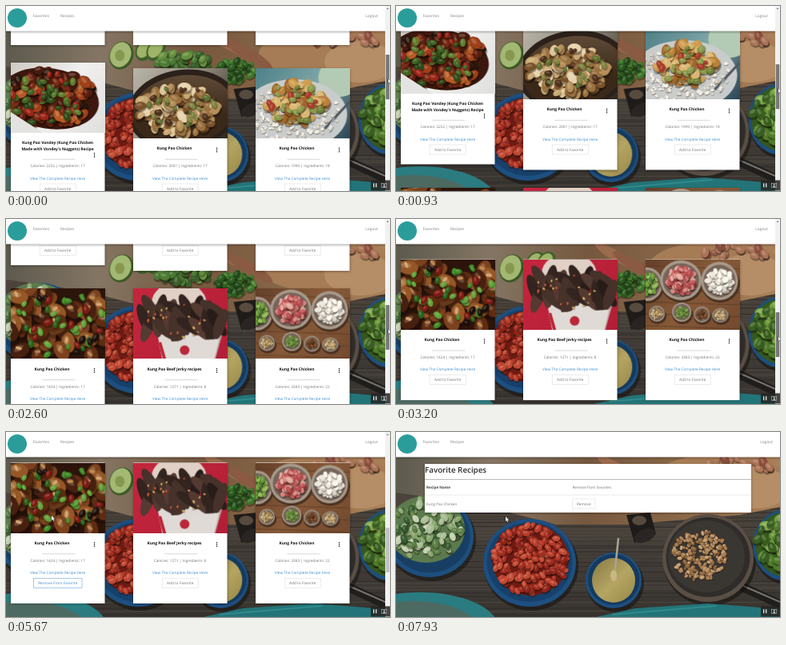
Recreate the animation shown at these times as an HTML page with a canvas. Size 480 by 232 pixels, loop 8000 ms.

```html
<!DOCTYPE html>
<html lang="en">
<head>
<meta charset="utf-8">
<title>Recipes</title>
<style>
html, body { margin: 0; width: 100%; height: 100%; overflow: hidden; background: #fff; }
canvas { display: block; width: 480px; height: 232px; }
</style>
</head>
<body>
<canvas id="stage"></canvas>
<script>
const W = 480, H = 232, LOOP = 8000;
const CARD_W = 117.5, CARD_H = 176.5, PHOTO_H = 88;
const FONT = '"Open Sans", "Noto Sans", sans-serif';
const GRAY = '#747474', BLUE = '#3c8dce';
const dpr = Math.max(1, window.devicePixelRatio || 1);

// Drawing helpers: g is always the current 2D context
let g, seed;
const random = () => {
  seed = (seed * 1664525 + 1013904223) >>> 0;
  return seed / 4294967296;
};
const pick = list => list[Math.floor(random() * list.length)];

function rect(x, y, w, h, color) {
  g.fillStyle = color;
  g.fillRect(x, y, w, h);
}
function oval(x, y, rx, ry, color, turn = 0) {
  g.fillStyle = color;
  g.beginPath();
  g.ellipse(x, y, rx, ry, turn, 0, 7);
  g.fill();
}
function poly(points, color) {
  g.fillStyle = color;
  g.beginPath();
  points.forEach(([x, y]) => g.lineTo(x, y));
  g.fill();
}
function line(x1, y1, x2, y2, color, width) {
  g.strokeStyle = color;
  g.lineWidth = width;
  g.beginPath();
  g.moveTo(x1, y1);
  g.lineTo(x2, y2);
  g.stroke();
}
// One lit piece of food with a soft shadow below it
function morsel(x, y, s, color) {
  const turn = random() * 3;
  oval(x + s * 0.1, y + s * 0.3, s * 1.05, s * 0.75, 'rgba(15,8,4,.35)', turn);
  oval(x, y, s, s * 0.68, color, turn);
  oval(x - s * 0.15, y - s * 0.2, s * 0.5, s * 0.25, 'rgba(255,245,225,.2)', turn);
}
function scatter(n, x, y, rx, ry, size, colors) {
  for (let i = 0; i < n; i++) {
    const a = random() * 6.283, d = Math.sqrt(random());
    morsel(x + rx * d * Math.cos(a), y + ry * d * Math.sin(a), size * (0.7 + random() * 0.6), pick(colors));
  }
}
function shade(x1, y1, x2, y2, ...colors) {
  const fill = g.createLinearGradient(x1, y1, x2, y2);
  colors.forEach((c, i) => fill.addColorStop(i / (colors.length - 1), c));
  return fill;
}
function bowl(x, y, rx, ry, rim, inside) {
  oval(x + 2, y + 4, rx + 1, ry + 1, 'rgba(15,12,10,.5)');
  oval(x, y, rx, ry, rim);
  oval(x, y - 1, rx * 0.92, ry * 0.91, inside);
}
function layer(w, h, start, draw) {
  const canvas = document.createElement('canvas');
  canvas.width = w * dpr;
  canvas.height = h * dpr;
  g = canvas.getContext('2d');
  g.scale(dpr, dpr);
  seed = start;
  draw(w, h);
  return canvas;
}

const backdrop = layer(W, H, 11, () => {
  rect(0, 0, W, H, shade(0, 90, 0, H, '#4c443c', '#423d38', '#37332f'));
  for (let y = 98; y < H; y += 4) line(0, y, W, y + random() * 6 - 3, pick(['#302c29', '#4e4841', '#3d3832']), 1);
  // cutting board, avocado, hands and bread
  poly([[0, 25], [W, 25], [W, 94], [430, 104], [290, 116], [200, 116], [130, 98], [60, 84], [0, 76]],
    shade(0, 30, W, 60, '#5c5a4e', '#857664', '#76583f', '#8a6848', '#ab8158'));
  oval(405, 60, 85, 32, '#a67c56');
  oval(448, 70, 45, 26, '#b58d66');
  scatter(18, 430, 40, 50, 9, 6, ['#94584a', '#aa7459', '#8c4c3c']);
  oval(146, 62, 15, 18, '#3c5a24', 0.4);
  oval(145, 61, 13, 16, '#a3b873', 0.4);
  oval(144, 62, 6, 7, '#86984f');
  for (const x of [176, 190]) {
    oval(x, 55, 11, 15, '#40602a', 0.6);
    oval(x - 1, 54, 8, 12, '#9fb469', 0.6);
  }
  scatter(45, 225, 68, 32, 13, 6, ['#4c7a34', '#66913f', '#38602a']);
  for (let i = 0; i < 5; i++) oval(270 + i * 12, 42 + i * 6, 23, 6, pick(['#8a5a42', '#9c6a4d']), 0.6);
  scatter(60, 290, 82, 25, 13, 5, ['#2a5a20', '#3c7528', '#4f8733', '#204619']);
  // bowls and pan
  bowl(42, 131, 55, 51, '#1d4f7e', '#183f63');
  oval(38, 122, 48, 42, '#5c7a4d');
  scatter(125, 37, 121, 44, 38, 5, ['#a9bd96', '#c3d0b2', '#5b7f46', '#365c30', '#86a56e']);
  bowl(167, 164, 58, 55, '#1d4f80', '#17406a');
  oval(168, 160, 48, 45, '#6b1b13');
  scatter(210, 168, 160, 46, 43, 4.6, ['#a42d1f', '#b83b2a', '#90241a', '#c24a35']);
  poly([[288, 104], [318, 101], [325, 128], [298, 139]], '#1f1b19');
  oval(311, 130, 14, 8, '#2a2522', -0.4);
  oval(304, 111, 9, 6, '#574b40');
  bowl(272, 186, 35, 35, '#1d4f80', '#153a5e');
  oval(272, 186, 27, 28, shade(248, 165, 296, 214, '#8e8048', '#b5a562', '#9a8a49'));
  line(278, 133, 273, 180, '#aaa391', 2.5);
  oval(272, 180, 4, 7, '#c4b983');
  line(432, 194, 482, 217, '#1f1e1d', 11);
  line(434, 193, 482, 214, '#77736d', 2);
  bowl(390, 158, 57, 55, '#5a4f45', '#2f2c2a');
  oval(388, 156, 48, 45, '#3a3632');
  scatter(210, 380, 154, 34, 31, 2.8, ['#b58a5c', '#a27548', '#c29b70', '#8b6139']);
  bowl(485, 142, 39, 44, '#1d4f80', '#36571f');
  scatter(70, 483, 137, 31, 34, 7, ['#4f7c2a', '#6a983a', '#375e20', '#7da84c']);
  // cloth
  oval(30, 246, 98, 45, '#2a7c80');
  oval(22, 252, 84, 40, '#4d6a62');
  poly([[250, 232], [300, 221], [390, 215], [480, 222], [480, 232]], '#237478');
  line(270, 229, 400, 218, '#308a8c', 2);
});

const photos = {
  nuggets: layer(CARD_W, PHOTO_H, 3, (w, h) => {
    rect(0, 0, w, h, shade(0, 0, w, h, '#cfcac4', '#f1f0ef', '#dfdfde'));
    oval(48, 45, 62, 38, '#3b170d', 0.15);
    scatter(130, 48, 43, 56, 35, 7, ['#7a2b14', '#471a0e', '#a04019', '#b95a25', '#5f2010', '#27160c']);
    scatter(45, 42, 45, 50, 33, 5, ['#3f6322', '#2a4a18', '#5d7f2f', '#9c2418']);
    poly([[0, 62], [40, 88], [0, 88]], '#e3e3e2');
  }),
  pan: layer(CARD_W, PHOTO_H, 8, (w, h) => {
    rect(0, 0, w, h, shade(0, 0, w, h, '#b9b5a8', '#8d877a', '#2c251e'));
    oval(62, 52, 70, 50, '#2b211a', -0.15);
    oval(62, 53, 64, 44, shade(0, 10, 0, 60, '#5e4936', '#3a2819'), -0.15);
    scatter(110, 56, 53, 50, 30, 7, ['#c9a772', '#b68f58', '#dcc398', '#9a713f', '#e6d3ae', '#7a522b']);
    scatter(30, 62, 50, 44, 28, 4, ['#7d8440', '#5f7030', '#4c2e1b']);
  }),
  rice: layer(CARD_W, PHOTO_H, 5, (w, h) => {
    rect(0, 0, w, h, shade(0, 0, w, h, '#4f8088', '#7fa6a8', '#2c4455'));
    oval(104, 12, 26, 24, '#b3cbb4');
    oval(48, 58, 66, 44, '#c9cccb');
    scatter(230, 47, 56, 57, 36, 2.5, ['#f3efe6', '#dfd9cc', '#c8c2b6']);
    scatter(75, 50, 43, 37, 26, 7, ['#bb8138', '#cf9d4f', '#a16529', '#dab772']);
    scatter(28, 48, 43, 37, 25, 4.5, ['#a93a2a', '#6b7f38', '#8a9a4c']);
    line(86, 76, 117, 42, '#4d5860', 3);
    for (let i = 0; i < 4; i++) line(84 + i * 4, 86 - i, 98 + i * 4, 62 + i, '#c3cacd', 1.2);
  }),
  glazed: layer(CARD_W, PHOTO_H, 21, (w, h) => {
    rect(0, 0, w, h, '#2c140b');
    for (let i = 0; i < 46; i++) {
      const x = random() * w, y = random() * h;
      morsel(x, y, 13, pick(['#7c421d', '#955726', '#5f2c12', '#47200f']));
      oval(x - 2, y - 3, 4, 2, pick(['#c18a52', '#d7a873']), i);
    }
    scatter(34, 62, 44, 58, 42, 4.5, ['#3f8a27', '#27631c', '#62a33a']);
    scatter(14, 60, 44, 55, 40, 5, ['#7c1a12', '#1a0e0a']);
  }),
  jerky: layer(CARD_W, PHOTO_H, 14, (w, h) => {
    rect(0, 0, w, h, shade(0, 0, w, h, '#c5263e', '#b21f36'));
    oval(57, 17, 34, 25, '#e0d0c6');
    poly([[30, 56], [112, 52], [102, 88], [36, 88]], '#dfd9d5');
    poly([[102, 53], [112, 50], [102, 88], [96, 88]], '#b4a8a4');
    for (let i = 0; i < 24; i++) {
      const x = 14 + i * 4.1, y = 38 + Math.sin(i * 2.3) * 13;
      oval(x, y, 20, 7, pick(['#33241f', '#46322b', '#543a31', '#281c19']), 1.2 + Math.sin(i * 1.7) * 0.7);
    }
    scatter(22, 58, 38, 44, 24, 1.7, ['#d5a85d', '#c95332']);
    poly([[31, 67], [107, 63], [101, 88], [37, 88]], '#e0dad6');
    poly([[31, 67], [35, 67], [41, 88], [37, 88]], '#b92739');
    oval(64, 77, 6, 6, '#b92739');
  }),
  bowls: layer(CARD_W, PHOTO_H, 7, (w, h) => {
    rect(0, 0, w, h, shade(0, 0, w, h, '#64402a', '#875a38', '#734a2f'));
    for (let y = 8; y < h; y += 15) line(0, y, w, y + 4, '#5a3925', 0.8);
    const dishes = [
      [2, 31, 19, 21, ['#699b38', '#94b956', '#3f762b']],
      [44, 26, 26, 25, ['#c75a5a', '#dc8580', '#b6484b', '#e4aaa0']],
      [92, 27, 23, 24, ['#eee9de', '#dcd3c7', '#fffaf0']],
      [45, 66, 12, 12, ['#5d8b35', '#8ba351']],
      [70, 69, 10, 10, ['#62381d', '#8c532c']],
      [93, 70, 10, 9, ['#c3a068', '#dec493']],
      [14, 68, 10, 10, ['#d5bc87', '#b7914f']]
    ];
    for (const [x, y, rx, ry, colors] of dishes) {
      oval(x + 1, y + 3, rx + 1, ry, '#483020');
      oval(x, y, rx, ry, '#a89a8b');
      oval(x, y, rx * 0.87, ry * 0.85, '#75655a');
      scatter(rx * 4, x, y, rx * 0.67, ry * 0.63, rx * 0.16, colors);
    }
  })
};

const CARDS = [
  { x: 6, y: 71, photo: 'nuggets', title: ['Kung Pao Vondey (Kung Pao Chicken', "Made with Vondey's Nuggets) Recipe"], calories: 2252, ingredients: 17 },
  { x: 159, y: 78, photo: 'pan', title: ['Kung Pao Chicken'], calories: 2001, ingredients: 17 },
  { x: 312, y: 78, photo: 'rice', title: ['Kung Pao Chicken'], calories: 1990, ingredients: 18 },
  { x: 6, y: 277, photo: 'glazed', title: ['Kung Pao Chicken'], calories: 1424, ingredients: 17, clickable: true },
  { x: 159, y: 277, photo: 'jerky', title: ['Kung Pao Beef Jerky recipes'], calories: 1271, ingredients: 8 },
  { x: 312, y: 277, photo: 'bowls', title: ['Kung Pao Chicken'], calories: 3383, ingredients: 22 }
];

// Rows are [time, value, ...]; the given function eases each stretch
const SCROLL = [[0, 0], [70, 0], [900, 49], [1250, 49], [2130, 99.5], [2600, 189.5], [3400, 238.5]];
const POINTER = [[3500, 478, 150], [4350, 69, 192.5], [5300, 69, 192.5], [6050, 44.5, 14], [7150, 44.5, 14], [7930, 137, 106]];
const CLICK = 4950, STATUS = 6200, NEXT_PAGE = 7300, RELEASE = 3480;
const linear = p => p;
const smooth = p => p * p * (3 - 2 * p);

function track(rows, t, ease) {
  const i = rows.findIndex(row => row[0] > t);
  if (i === 0) return rows[0].slice(1);
  if (i < 0) return rows[rows.length - 1].slice(1);
  const a = rows[i - 1], b = rows[i], p = ease((t - a[0]) / (b[0] - a[0]));
  return a.slice(1).map((v, k) => v + (b[k + 1] - v) * p);
}

// y is the middle of the capitals
function text(str, x, y, { size = 4.7, weight = 400, color = GRAY, align = 'left' } = {}) {
  g.font = `${weight} ${size}px ${FONT}`;
  g.textAlign = align;
  g.fillStyle = color;
  g.fillText(str, x, y + size * 0.36);
}
function button(label, x, y, w, color = GRAY, border = '#dedede') {
  rect(x, y, w, 12, '#fff');
  g.strokeStyle = border;
  g.lineWidth = 0.6;
  g.strokeRect(x, y, w, 12);
  text(label, x + w / 2, y + 6, { color, align: 'center' });
}
function panel(x, y, w, h) {
  g.save();
  g.shadowColor = 'rgba(0,0,0,.35)';
  g.shadowBlur = 3 * dpr;
  g.shadowOffsetY = dpr;
  rect(x, y, w, h, '#fff');
  g.restore();
}

function drawCard(card, scroll, hovered, favorite) {
  const { x, title } = card, y = card.y - scroll;
  if (y > H || y + CARD_H < 20) return;
  panel(x, y, CARD_W, CARD_H);
  g.drawImage(photos[card.photo], x, y, CARD_W, PHOTO_H);
  const middle = x + 58.5, wrapped = title.length > 1, drop = wrapped ? 7 : 0;
  title.forEach((row, i) => text(row, middle - (wrapped ? 0 : 7), y + 100.5 + i * 7.4,
    { size: 4.95, weight: 700, color: '#111', align: 'center' }));
  const dots = y + 102.5 + (wrapped ? 13.5 : 0);
  for (let i = -1; i < 2; i++) oval(x + 104.5, dots + i * 2.2, 0.75, 0.75, '#111');
  line(x + 39.5, y + drop + 114.3, x + 80.5, y + drop + 114.3, '#bcbcbc', 0.6);
  text(`Calories: ${card.calories} | Ingredients: ${card.ingredients}`, middle, y + drop + 122.5, { align: 'center' });
  text('View The Complete Recipe Here', middle, y + drop + 138, { color: BLUE, align: 'center' });
  if (favorite) button('Remove From Favorite', x + 28.5, y + 145, 60.5, BLUE, '#6ba6d8');
  else button('Add to Favorite', x + 36.2, y + drop + 145, 45, GRAY, hovered ? '#999' : '#dedede');
}

function drawNav(width, hovered) {
  rect(0, 31, width, 4, shade(0, 31, 0, 35, 'rgba(0,0,0,.3)', 'rgba(0,0,0,0)'));
  rect(0, 0, width, 31.5, '#fff');
  oval(14, 15, 12, 12, '#2a9d9b');
  if (hovered) rect(28, 0, 32, 24, '#ececec');
  text('Favorites', 33.5, 12, { size: 4.85, color: hovered ? BLUE : '#858585' });
  text('Recipes', 68, 12, { size: 4.85, color: '#858585' });
  text('Logout', width - 9, 12, { size: 4.85, color: '#858585', align: 'right' });
}

function drawFavorites() {
  panel(36, 40, 408, 61);
  text('Favorite Recipes', 36, 47.8, { size: 9.8, weight: 600, color: '#2c2c2c' });
  line(36, 59.5, 444, 59.5, '#aaa', 0.8);
  text('Recipe Name', 38, 69.5, { size: 4.6, weight: 700, color: '#444' });
  text('Remove from favorites', 220.5, 69.5, { size: 4.6 });
  line(36, 79, 444, 79, '#ddd', 0.6);
  text('Kung Pao Chicken', 38, 90, { size: 4.6 });
  button('Remove', 220.5, 84, 28.5);
}

function drawControls() {
  rect(456, 218.5, 24, 13, 'rgba(38,37,35,.85)');
  rect(459, 222.3, 1.4, 5, '#ddd');
  rect(462, 222.3, 1.4, 5, '#ddd');
  g.strokeStyle = '#bbb';
  g.lineWidth = 0.6;
  g.strokeRect(469.5, 222.3, 6.3, 5);
  oval(472.7, 224.2, 0.9, 0.9, '#ddd');
  poly([[471, 227.2], [472.7, 225], [474.5, 227.2]], '#ddd');
}

const HAND = new Path2D('M-.7 0Q0-.7.7 0V3L3.6 3.7 4.2 4.6 3.8 7.2 3 8.8H-1L-3.2 5.6-2.6 4.7-.7 6Z');
const ARROW = new Path2D('M0 0V6L1.4 4.8 2.4 7 3.3 6.6 2.4 4.5H4.2Z');
function drawPointer(x, y, hand) {
  const shape = hand ? HAND : ARROW;
  g.save();
  g.translate(x, y);
  g.lineWidth = 0.9;
  g.strokeStyle = '#222';
  g.stroke(shape);
  g.fillStyle = '#fff';
  g.fill(shape);
  g.restore();
}

const stage = document.getElementById('stage');
stage.width = W * dpr;
stage.height = H * dpr;
const screen = stage.getContext('2d');

function draw(t) {
  g = screen;
  g.setTransform(dpr, 0, 0, dpr, 0, 0);
  g.textRendering = 'geometricPrecision';
  const [scroll] = track(SCROLL, t, linear);
  const thumb = 61 + scroll * 0.2474;
  const [px, py] = t < POINTER[0][0] ? [478, thumb + 30] : track(POINTER, t, smooth);
  const overLink = px > 28 && px < 60 && py < 24;
  const overButton = px > 42 && px < 87 && py > 183 && py < 195;
  const listing = t < NEXT_PAGE, width = listing ? 474 : W;

  g.drawImage(backdrop, 0, 0, width, H);
  if (listing) {
    for (const x of [6, 159, 312]) panel(x, -128 - scroll, CARD_W, 177);
    for (const card of CARDS) {
      drawCard(card, scroll, card.clickable && overButton, card.clickable && t >= CLICK);
    }
    rect(474, 0, 6, H, '#f1f1f1');
    rect(474.7, thumb, 4.6, 56, t < RELEASE ? '#787878' : '#c1c1c1');
    poly([[475.7, 4], [477, 2.2], [478.3, 4]], '#666');
  } else drawFavorites();
  drawNav(width, overLink);
  if (t >= STATUS && listing) {
    rect(0, 224, 159, 8, '#c9c9c9');
    rect(0, 224.6, 158.5, 7.4, '#fff');
    text('Connecting...', 2, 228, { size: 4.1 });
  }
  drawControls();
  drawPointer(px, py, overLink || overButton);
}

function tick() {
  draw(performance.now() % LOOP);
  requestAnimationFrame(tick);
}
tick();
</script>
</body>
</html>
```
